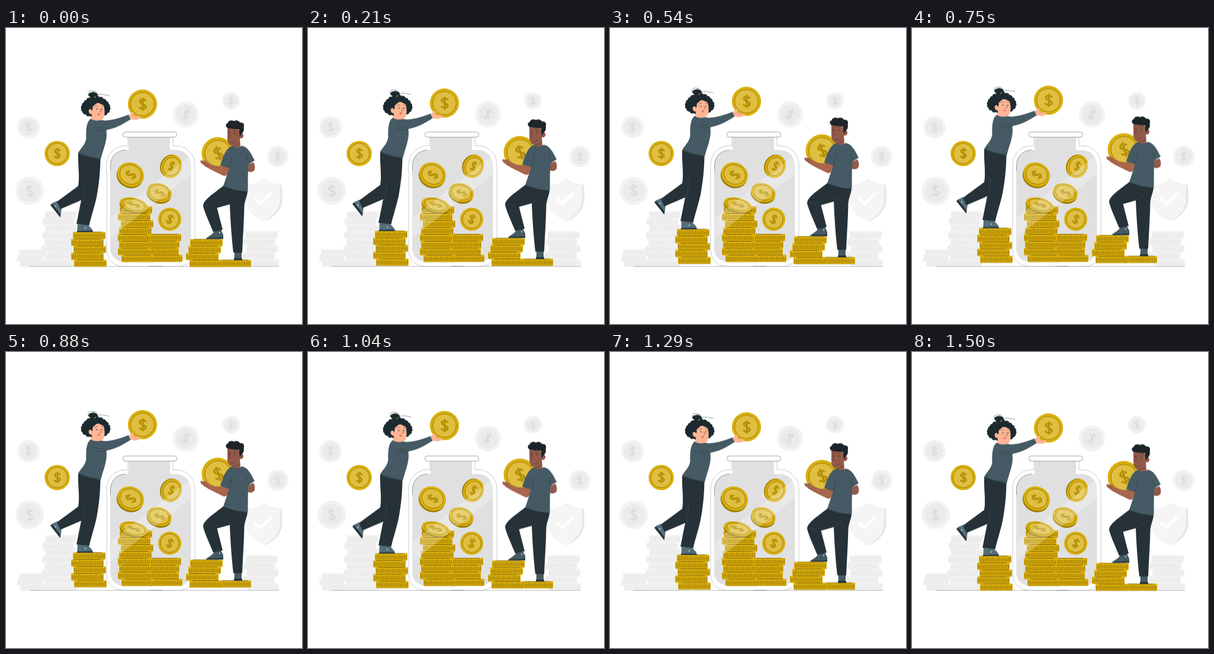
Write an HTML page that moves like this. It is 500 by 500 pixels and loops after 1.54 s.

```html
<!DOCTYPE html>
<html lang="en">
<head>
<meta charset="utf-8">
<title>Savings jar</title>
<style>
html, body { margin: 0; width: 100%; height: 100%; overflow: hidden; background: #fff; }
svg { display: block; width: 100vw; height: 100vh; }
.line { fill: none; stroke: #263238; stroke-width: .5; stroke-linecap: round; }
</style>
</head>
<body>
<svg viewBox="0 0 500 500">
  <g id="backdrop">
    <path d="M436 255C446 262 456 264 466 265L467 291C465 309 451 321 438 326C420 320 406 308 405 290V266C417 265 427 262 436 255Z" fill="#e6e6e6"/>
    <path d="M435 255C444 262 454 264 463 265V291C461 308 449 320 436 326C418 319 406 308 405 290V266C417 265 427 262 435 255Z" fill="#f5f5f5"/>
    <path d="M420 288L430 297L448 279" fill="none" stroke="#fff" stroke-width="5"/>
  </g>
  <path class="line" d="M40 402.700H461" opacity=".65"/>
  <g id="jar">
    <path d="M206 184V199H202C184 199 170 213 170 231V374C170 391 181 402.500 199 402.500H291C308 402.500 319 391 319 374V231C319 213 305 199 287 199H282V184Z" fill="#fff" stroke="#263238" stroke-opacity=".5" stroke-width=".5"/>
    <path d="M207 184V206H204C187 206 176 217 176 233V371C176 386 186 395 201 395H288C303 395 312.500 386 312.500 371V233C312.500 217 302 206 285 206H277V184Z" fill="#e0e0e0"/>
    <rect x="197.500" y="175.700" width="91" height="8.600" rx="4" fill="#fff" stroke="#263238" stroke-opacity=".7" stroke-width=".6"/>
    <path class="line" d="M176.500 241V231C178 215 188 207 202 206M242 402.700H264" opacity=".8"/>
  </g>
  <g id="savings"></g>
  <path d="M312.500 214V247L177 354V320Z" fill="#fff" opacity=".25"/>
  <g id="still"></g>
  <g id="lift">
    <g id="piles"></g>

    <g id="woman">
      <path d="M78 296L87 292L94 304L92 319L88 315L75 299Z" fill="#546e7a"/>
      <path d="M75 299L78 297L92 315L91.500 320Z" fill="#263238"/>
      <path d="M87 293L93 304" stroke="#fff" stroke-width="1"/>
      <circle cx="84" cy="301" r="1" fill="#fff"/>
      <path d="M121 331L139 333L145.500 340L147 344.800H120Z" fill="#546e7a"/>
      <path d="M120 343L146 342.500L147 344.800H120Z" fill="#263238"/>
      <circle cx="134" cy="338" r=".9" fill="#fff"/>
      <path d="M122 211L159.500 221C159 246 157 264 153 286C149 304 144 318 140.500 333.500L119 331L127 291L92 306L86 293.500L122 267C125 250 121 232 122 211Z" fill="#263238"/>
      <path class="line" d="M129 292C132 281 133 272 132 260" style="stroke:#455a64"/>
      <path d="M144 153C152 155 160 155 167 156.500C182 156 194 151 207 146.500L211 154C197 163 184 170 169.500 172.500C172 190 164 205 160 222C146 219 133 217 122 211C126 203 134.500 197 135.500 186C135 172 136 157 144 153Z" fill="#455a64"/>
      <path class="line" d="M169 172C163 174 156 175 150 172M151 167C155 169 160 170 165 169M125 211C135 216 147 219 158 220"/>
      <path d="M207 147C211 145 212 142 215 142C217 144 214 146 216 148C220 149 225 149 228 151C226 155 217 157 210 153.500Z" fill="#ffb594"/>
      <path class="line" d="M215 148L221 151" style="stroke:#d47d61"/>
      <path id="curls" fill="#1c2a30"/>
      <ellipse cx="147" cy="113" rx="8" ry="4.500" fill="#1c2a30"/>
      <path class="line" d="M139 112C136 106 148 104 149 109M153 116C158 108 165 114 174 114M146 109C150 103 152 109 154 112"/>
      <path d="M149 117.500L152 116" stroke="#dbb112" stroke-width="1.200"/>
      <path d="M147 130C151 126 157 126 164 128C167 135 167.500 146 165 152C161 157 153 158 144.500 154.500L145 146C139 146 138 138 142 137C144 137 145 139 146 140Z" fill="#ffb594"/>
      <path d="M145 133C149 132 151 128 155 126C159 128 163 129 166 132C165 124 157 120 150 122C146 124 144 128 145 133Z" fill="#1c2a30"/>
      <path class="line" d="M150 133Q152 131 155 132M161 132Q163 131 165 133M159 137L161 141L158 142"/>
      <circle cx="153.500" cy="137" r=".9" fill="#263238"/><circle cx="162" cy="137" r=".9" fill="#263238"/>
      <path d="M154.500 145Q157 145 159 144Q158 148 155 147Z" fill="#d4654f"/>
    </g>

    <g id="man">
      <path d="M410 230L418 227C421 232 421 238 419 241C416 244 411 244 408 242Z" fill="#935a49"/>
      <path d="M386 378H398V392H385.500Z" fill="#455a64"/>
      <path d="M385 389H399V392.300H385Z" fill="#263238"/>
      <path d="M352 343L363 341L367 349V356H338C340 352 348 351 352 343Z" fill="#455a64"/>
      <path d="M337.500 356.500C341 354 346 354 351 354.500L367 353.500V356.500Z" fill="#263238"/>
      <circle cx="361" cy="346" r="1" fill="#fff"/>
      <path d="M368 266L408 276C407.500 284 403.500 291 402.500 301C402 328 400 354 399 379.500H384C381 354 379 324 378 298L356.500 304L366 341L350 344.500C344 330 336 313 333 301C333 290 352 279 368 266Z" fill="#263238"/>
      <path class="line" d="M378 298C382 294 388 292 392 289M337 300C341 300 346 302 350 305" style="stroke:#455a64"/>
      <path d="M369 230C364 237 352 233 343 229L337 224C334 223 333 226 330 223C327 225 329 229 332 230C337 235 347 240 368 250C374 251 376 243 379 235Z" fill="#a8664d"/>
      <path class="line" d="M331 228L338 229M335 233L341 232" style="stroke:#70402f"/>
      <path d="M383 199C389 202 395 202 398 199C407 201 412 207 420 224L410 230C408 244 409 259 408.500 276C393 276 380 272 367 267L377 237L362 232C367 216 372 202 383 199Z" fill="#455a64"/>
      <path class="line" d="M377 237C379 230 381 223 382 216M410 230C408 226 408 221 407 217"/>
      <path d="M374 167C378 164 392 165 396 178C400 177 403 182 400 185C399 187 396 187 395 186L396 200C391 204 386 202 383 199C379 199 375 196 374 189Z" fill="#935a49"/>
      <path d="M374 169C370 166 371 161 374.500 161C375 156 382 155 385 157.500C389 154.500 394 157 395.500 160C401 159 403.500 164 401.500 168C403 173 400 177 398 179L395 184L393.500 171C387 171 378 170 374 169Z" fill="#1c2529"/>
      <path class="line" d="M375 174L379 173M384 173Q387 172 389 175M379 178L377 184L380 185M380 193Q385 195 388 191M384 199Q389 200 393 195"/>
      <circle cx="378" cy="177.500" r=".9" fill="#1c2529"/><circle cx="386.500" cy="178" r=".9" fill="#1c2529"/>
    </g>
  </g>
</svg>
<script>
const $ = id => document.getElementById(id);
const gold = { rim: '#d8ae0a', face: '#e0be3f', ring: '#8f7409', sign: '#b89408', edge: '#9c7e08', side: '#ddb00a', tick: '#5c4b08' };
const grey = { rim: '#f2f2f2', face: '#ebebeb', ring: '#f8f8f8', sign: '#dadada', edge: '#ededed', side: '#f0f0f0', tick: '#e2e2e2' };
const sign = 'M5-5C4-9-5-9-5-4.500C-5 0 5 0 5 4.500C5 9-5 9-5.500 5M0-11V11';

// A coin squashed to rx by ry; its sign can spin separately within the face.
function coin(x, y, rx, ry, turn, c, depth = 0, spin = 0) {
  const k = rx / 25;
  const under = depth ? `<ellipse cy="${depth}" rx="${rx}" ry="${ry}" fill="${c.edge}"/>` : '';
  const mark = (color, dx) => `<path d="${sign}" transform="translate(${dx * k} 0) scale(${k} ${k * ry / rx}) rotate(${spin})" fill="none" stroke="${color}" stroke-width="2.300"/>`;
  return `<g transform="translate(${x} ${y}) rotate(${turn})">${under}
    <ellipse rx="${rx}" ry="${ry}" fill="${c.rim}"/>
    <ellipse rx="${rx * .8}" ry="${ry * .8}" fill="${c.face}" stroke="${c.ring}" stroke-width=".8"/>
    ${c === gold ? mark(c.ring, .8) : ''}${mark(c.sign, 0)}</g>`;
}

// One coin seen from its side, with milled ticks.
function slab(x, y, w, c, h = 11.8) {
  let ticks = '';
  for (let i = 0; i < w / 3 - 1; i++) {
    const top = 2.5 + (i * 7 + x | 0) % 3 * .6;
    ticks += `M${(x + 2 + i * 3).toFixed(1)} ${(y + top).toFixed(1)}V${(y + h - 2).toFixed(1)}`;
  }
  return `<rect x="${x}" y="${y}" width="${w}" height="${h}" rx="1" fill="${c.side}"/>
    <path d="${ticks}" stroke="${c.tick}" stroke-width=".7"/>
    <path d="M${x + 1} ${y + h - .3}h${w - 2}" stroke="${c.edge}" stroke-width=".6"/>
    ${c === gold ? `<path d="M${x + w * .1} ${y + .3}h${w * .8}" stroke="${c.tick}" stroke-width=".7"/>` : ''}`;
}

const pile = (top, lefts, c, w = 55, step = 11.75) =>
  lefts.map((x, i) => slab(x, top + i * step, w, c)).join('');

$('backdrop').innerHTML +=
  coin(38, 167.5, 19, 19, 0, grey) + coin(304, 146, 22, 22, 30, grey) +
  coin(380, 123, 15, 15, 0, grey) + coin(459, 217, 18, 18, 0, grey) +
  coin(40, 275, 24, 24, -8, grey) +
  pile(374, [22, 19, 24], grey, 43, 8.7) +
  pile(309.5, [66, 62, 66, 61, 65, 60, 64, 66], grey, 53, 11.6) +
  pile(343.5, [405, 401, 406, 400, 407], grey, 54);

$('savings').innerHTML =
  pile(348, [241, 238, 237, 243], gold) +
  pile(301.5, [192, 189, 194, 191, 189, 191, 189, 195], gold, 55, 11.7) +
  coin(210.5, 247.5, 23, 20, 24, gold, 3, -80) +
  coin(279.5, 234, 20, 17, -62, gold, -2, 80) +
  coin(259, 278, 21, 15.5, 17, gold, 3, -80) +
  coin(216, 298.5, 24, 11.5, 14, gold, 3, -75) +
  coin(276.5, 323, 19.5, 19.5, 25, gold);

$('still').innerHTML = coin(86.5, 212, 21.3, 21.3, 0, gold);

$('piles').innerHTML =
  pile(344.5, [113, 110, 114, 110, 115], gold) +
  slab(359, 391.8, 55, gold) +
  pile(356.7, [311, 308, 304, 310], gold) +
  coin(230.5, 128.7, 24.6, 24.6, 0, gold) +
  coin(358, 212, 27.5, 27.5, -18, gold);

// Uneven scalloped outline for the curly hair.
let curls = '';
const lobes = 19;
for (let i = 0; i <= lobes; i++) {
  const a = i / lobes * 2 * Math.PI, r = 1 + .05 * Math.sin(3 * a);
  const x = (151.5 + 24 * r * Math.cos(a)).toFixed(1), y = (133.5 + 16.5 * r * Math.sin(a)).toFixed(1);
  curls += i ? `A4.500 4 0 0 1 ${x} ${y}` : `M${x} ${y}`;
}
$('curls').setAttribute('d', curls + 'Z');

$('lift').animate(
  [0, -6.9, 0].map(y => ({ transform: `translateY(${y}px)` })),
  { duration: 1540, iterations: Infinity, easing: 'linear' }
);
</script>
</body>
</html>
```
